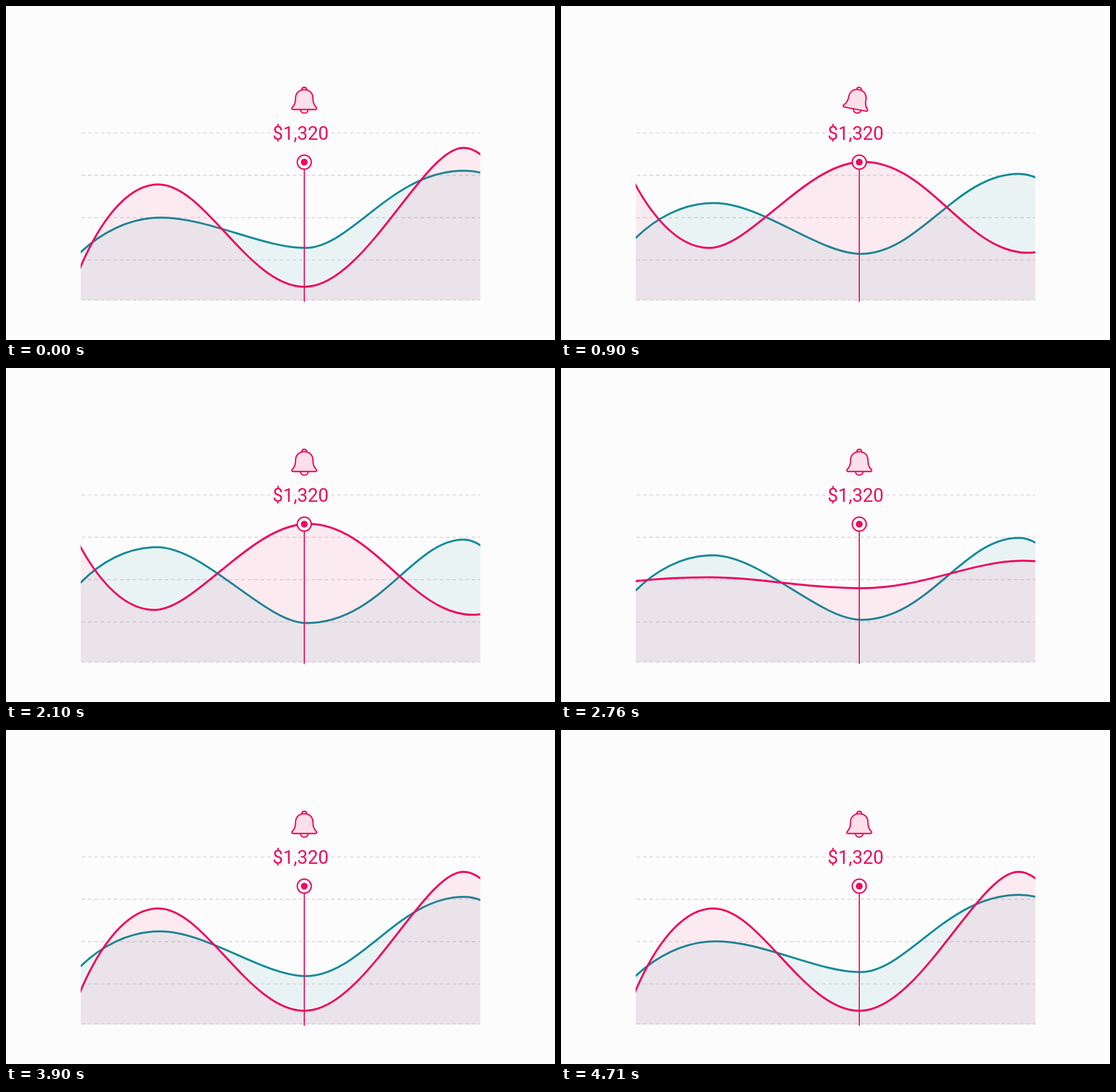
Recreate the animation shown at these times as an HTML page. Size 959 by 584 pixels, loop 4740 ms.

```html
<!DOCTYPE html>
<html lang="en">
<head>
<meta charset="utf-8">
<title>Price alert chart</title>
<style>
  html, body { margin: 0; width: 100%; height: 100%; overflow: hidden; background: #fcfcfc; }
  svg { display: block; width: 959px; height: 584px; }
  text { font: 400 32.5px Roboto, sans-serif; }
</style>
</head>
<body>
<svg viewBox="0 0 959 584" fill="none">
  <defs>
    <clipPath id="plot"><rect x="130.5" y="100" width="698" height="414.5"/></clipPath>
  </defs>
  <path d="M132 222H828M132 295.8H828M132 370.2H828M132 444H828M132 514H828"
        stroke="#d9d9dc" stroke-width="1.7" stroke-dasharray="6.4 4.77"/>
  <g clip-path="url(#plot)" stroke-width="3.5">
    <path id="tealArea" fill="#148c96" fill-opacity=".076"/>
    <path id="tealLine" stroke="#148c99"/>
    <path id="pinkArea" fill="#ed0a5f" fill-opacity=".068"/>
    <path id="pinkLine" stroke="#ee0860"/>
  </g>
  <g stroke="#ea0c5c">
    <path d="M521 286V517" stroke-width="2"/>
    <circle cx="521" cy="273" r="12.2" fill="#fff" stroke-width="2.5"/>
    <circle cx="521" cy="273" r="6" fill="#ea0c5c" stroke="none"/>
  </g>
  <text x="514.6" y="233.6" text-anchor="middle" fill="#ea0c5c">$1,320</text>
  <g stroke="#ea0c5c" stroke-width="2.3" stroke-linecap="round" stroke-linejoin="round">
    <path id="clapper" d="M514.3 181A6.7 6.4 0 0 0 527.7 181"/>
    <g id="bell">
      <path d="M516.8 146.5C517 140.8 525 140.8 525.2 146.5"/>
      <path fill="#fbdfe9" d="M502 181H540C543 181 543.5 178.5 541.6 176.8C537.5 173 536.2 169 536.2 161.5
        C536.2 152 530 146.3 521 146.3C512 146.3 505.8 152 505.8 161.5C505.8 169 504.5 173 500.4 176.8
        C498.5 178.5 499 181 502 181Z"/>
    </g>
    <path id="rings" stroke-width="2" d="M493 148.5C488 153 488 161 493 165.5M549 148.5C554 153 554 161 549 165.5"/>
  </g>
</svg>
<script>
const LOOP = 4740;
const el = id => document.getElementById(id);
const ramp = (t, a, b) => Math.min(1, Math.max(0, (t - a) / (b - a)));
const mix = (a, b, k) => a + (b - a) * k;

// A pose has two edge points and three turning points; turns carry the
// lengths of their level handles on the inner side(s).
const pose = (left, first, middle, last, right) => [left, first, middle, last, right];
const curves = {
  teal: [
    pose([130, 431], [271, 370, 82], [523, 423, 74, 80], [800, 288, 126], [830, 291.5]),
    pose([130, 374.5], [263, 312, 84], [525, 446.5, 72, 130], [799, 300.3, 86], [830, 311.5])
  ],
  pink: [
    pose([129, 459], [266, 312, 82], [522, 491, 98, 104], [799, 248, 70], [830, 260.5]),
    pose([115, 283], [259, 423, 72], [528, 272.5, 99, 114], [815, 431.5, 107], [860, 422])
  ]
};

function drawCurve(name, k) {
  const [from, to] = curves[name];
  const [[x0, y0], [x1, y1, out1], [x2, y2, in2, out2], [x3, y3, in3], [x4, y4]] =
    from.map((pt, i) => pt.map((v, j) => mix(v, to[i][j], k)));
  const d = `M${x0} ${y0}
    C${mix(x0, x1, 0.25)} ${mix(y0, y1, 0.55)} ${mix(x0, x1, 0.6)} ${y1} ${x1} ${y1}
    C${x1 + out1} ${y1} ${x2 - in2} ${y2} ${x2} ${y2}
    C${x2 + out2} ${y2} ${x3 - in3} ${y3} ${x3} ${y3}
    Q${mix(x3, x4, 0.5)} ${y3} ${x4} ${y4}`;
  el(name + "Line").setAttribute("d", d);
  el(name + "Area").setAttribute("d", `${d}V515H${x0}Z`);
}

// Symmetric cubic in-out.
const ease = p => p < 0.5 ? 4 * p ** 3 : 1 - 4 * (1 - p) ** 3;
const glide = p => mix(ease(p), p * p * (3 - 2 * p), 0.6);

function swing(t) {
  if (t < 750 || t > 1530) return 0;
  return 11.3 * Math.sin((t - 750) / 520 * 2 * Math.PI);
}

function draw(t) {
  drawCurve("teal", t < 2040 ? t / 2040 : (LOOP - t) / 2700);
  drawCurve("pink", glide(ramp(t, 0, 720)) - glide(ramp(t, 2396, 3116)));
  const a = swing(t);
  el("bell").setAttribute("transform", `rotate(${a} 521 144)`);
  el("clapper").setAttribute("transform", `rotate(${a / 2} 521 144)`);
  el("rings").setAttribute("opacity", 0.8 * (ramp(t, 950, 1100) - ramp(t, 1440, 1740)));
}

const start = performance.now();
function tick(now) {
  draw(Math.max(0, now - start) % LOOP);
  requestAnimationFrame(tick);
}
draw(0);
requestAnimationFrame(tick);
</script>
</body>
</html>
```
